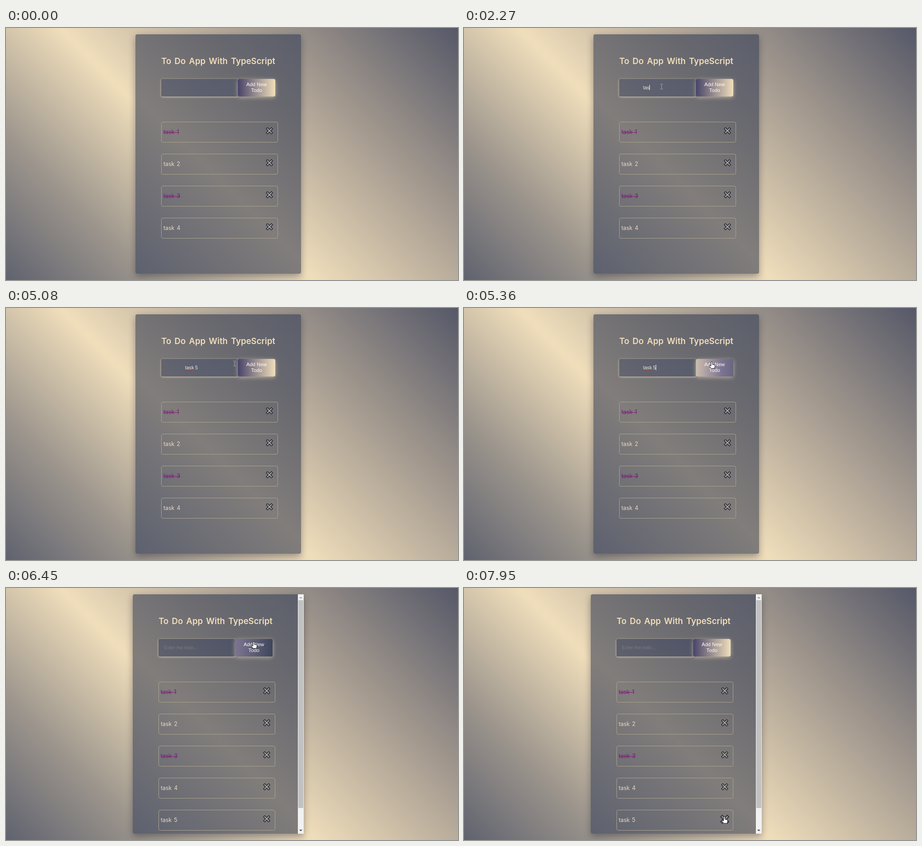
An HTML page for the animation above (8 s loop, 1002 px wide and 559 px high).

```html
<!DOCTYPE html>
<html lang="en">
<head>
<meta charset="utf-8">
<title>To Do App</title>
<style>
  :root { --wheat: #f0debb; --loop: 8s infinite; }
  html, body { margin: 0; width: 100%; height: 100%; overflow: hidden; }
  body {
    position: relative;
    background: linear-gradient(45deg, #5f626e, #9b948c 20%, #f0debb 43.5%, #9c938b 75%, #555868);
    font-family: Inter, "Noto Sans", sans-serif;
  }
  body div, body svg { position: absolute; box-sizing: border-box; }

  .card {
    left: 287px; top: 14px; width: 367px; height: 531px; border-radius: 4px;
    background: linear-gradient(45deg, #5d616f, #817d7b 44%, #69696f 75%, #5b5e6b);
    box-shadow: 0 6px 16px rgba(20, 22, 40, .38);
    animation: widen var(--loop) step-end;
  }
  @keyframes widen { 80.625%, to { left: 281px; width: 379px; } }

  .content { left: 0; top: 0; animation: shift var(--loop) step-end; }
  @keyframes shift { 80.625%, to { transform: translateX(-6px); } }

  .title {
    left: 320px; top: 63px; width: 301px; text-align: center; white-space: nowrap;
    font-size: 18.6px; line-height: 20px; font-weight: 600; word-spacing: 2.6px; color: var(--wheat);
  }

  .input, .button, .placeholder, .field { font-family: "Liberation Sans", Arial, sans-serif; }
  .input {
    left: 344px; top: 113px; width: 170px; height: 39px; border-radius: 4px;
    background: linear-gradient(45deg, #656670, #5d606e 45%, #595c6b);
    box-shadow: 0 1px 4px rgba(240, 222, 187, .85);
    animation: darken var(--loop) step-end;
  }
  @keyframes darken { 80.625%, to { background: linear-gradient(45deg, #5f616d, #585b69 45%, #505467); } }

  .button {
    left: 514px; top: 113px; width: 83px; height: 39px; padding-top: 6px; border-radius: 4px;
    font-size: 11.2px; line-height: 13px; text-align: center; color: #fffaf2;
    background: linear-gradient(90deg, #48446a, #f0debb 33.3%, #7d7592 66.7%, #3e465c) 0 0 / 300% 100%;
    box-shadow: 0 2px 10px rgba(240, 222, 187, .6);
    animation: hover var(--loop);
  }
  @keyframes hover {
    0%, 64.125% { background-position: 0 0; animation-timing-function: ease; }
    71.625%, 84.125% { background-position: 100% 0; animation-timing-function: ease; }
    91.625%, to { background-position: 0 0; }
  }

  .placeholder {
    left: 356px; top: 126px; white-space: nowrap; font-size: 10.5px; line-height: 12px; color: #7b7a7e;
  }
  .field { left: 397px; top: 126px; font-size: 10.6px; animation: blur var(--loop) step-end; }
  @keyframes blur { 70%, to { left: 356px; } }

  .typed {
    height: 12px; box-sizing: content-box !important; overflow: hidden; white-space: pre;
    line-height: 12px; color: #f3ead8; border-right: 1.3px solid transparent;
    animation: type var(--loop) step-end, blink var(--loop) step-end;
  }
  @keyframes type {
    0% { width: 0; }
    23.375% { width: .278em; }
    25.125% { width: .834em; }
    28.375% { width: 1.334em; }
    30% { width: 1.834em; }
    32.5% { width: 2.112em; }
    50.75% { width: 2.668em; }
    80.625%, to { width: 0; }
  }
  @keyframes blink {
    0%, 9.125%, 22.625%, 39.125%, 57.5%, 70%, to { border-color: transparent; }
    2.5%, 15.75%, 23.375%, 45.75%, 64.125% { border-color: #fff; }
  }
  .misspelt {
    top: 10px; width: 20px; height: 1.5px; background: #d0332c; opacity: 0;
    animation: misspelt var(--loop) step-end;
  }
  @keyframes misspelt { 32.5% { opacity: 1; } 80.625%, to { opacity: 0; } }

  .row {
    left: 344px; top: calc(208px + var(--i) * 71px); width: 259px; height: 46px; padding-left: 4px;
    border: 1px solid #aaa38e; border-radius: 4px; white-space: nowrap;
    font-size: 12.4px; line-height: 44px; word-spacing: 1.5px; color: #ecdaba;
  }
  .done { color: #7d167c; text-decoration: line-through 1px; }
  .cross { left: 229px; top: 9px; width: 20px; height: 20px; overflow: visible; }
  .cross use { stroke: #1d1e2a; stroke-width: 5.2; }
  .cross use + use { stroke: #a6a49f; stroke-width: 2.7; transform: scale(.87); }
  .late { opacity: 0; animation: appear var(--loop) step-end; }
  @keyframes appear { 80.625%, to { opacity: 1; } }
  .late .cross { animation: grow var(--loop); }
  @keyframes grow {
    0%, 96% { transform: none; animation-timing-function: ease; }
    98.5%, to { transform: translateY(1px) scale(1.25); }
  }

  .scrollbar { left: 647px; top: 14px; width: 13px; height: 531px; background: #f1f1f1; }
  .thumb { left: 1px; top: 13px; width: 11px; height: 461px; background: #c1c1c1; }
  .scrollbar svg { left: 0; top: 0; }

  .pointer { left: 0; top: 0; width: 1px; height: 1px; overflow: visible; animation: travel var(--loop); }
  @keyframes travel {
    0%, .875% { transform: translate(893px, 502px); animation-timing-function: ease-in-out; }
    10%, 60.875% { transform: translate(438px, 130px); animation-timing-function: ease-in-out; }
    65.5%, 83.125% { transform: translate(549px, 119px); animation-timing-function: linear; }
    89.25% { transform: translate(433px, 341px); animation-timing-function: linear; }
    90.5% { transform: translate(423px, 405px); animation-timing-function: ease-in-out; }
    92.6% { transform: translate(484px, 494px); animation-timing-function: ease-out; }
    96% { transform: translate(588px, 504px); }
    98.5%, to { transform: translate(577px, 507px); }
  }
  .pointer path { opacity: 0; stroke-linejoin: round; }
  .arrow, .hand { fill: #fff; stroke: #15151c; }
  .beam { fill: none; stroke: #b0aead; }
  .arrow { animation: arrow var(--loop) step-end; }
  .beam { animation: beam var(--loop) step-end; }
  .hand { animation: hand var(--loop) step-end; }
  @keyframes arrow { .875%, 84.125% { opacity: 1; } 8%, 96%, to { opacity: 0; } }
  @keyframes beam { 8% { opacity: 1; } 63.9%, to { opacity: 0; } }
  @keyframes hand { 63.9%, 96%, to { opacity: 1; } 84.125% { opacity: 0; } }
</style>
</head>
<body>
  <svg width="0" height="0"><defs><path id="x" d="M-6.2-6.2 6.2 6.2M6.2-6.2-6.2 6.2"/></defs></svg>

  <div class="card"></div>
  <div class="content">
    <div class="title">To Do App With TypeScript</div>
    <div class="input"></div>
    <div class="button">Add New<br>Todo</div>
    <div class="placeholder late">Enter the todo...</div>
    <div class="field">
      <div class="typed">task 5</div>
      <div class="misspelt"></div>
    </div>

    <div class="row" style="--i:0"><span class="done">task 1</span>
      <svg class="cross" viewBox="-10 -10 20 20"><use href="#x"/><use href="#x"/></svg></div>
    <div class="row" style="--i:1">task 2
      <svg class="cross" viewBox="-10 -10 20 20"><use href="#x"/><use href="#x"/></svg></div>
    <div class="row" style="--i:2"><span class="done">task 3</span>
      <svg class="cross" viewBox="-10 -10 20 20"><use href="#x"/><use href="#x"/></svg></div>
    <div class="row" style="--i:3">task 4
      <svg class="cross" viewBox="-10 -10 20 20"><use href="#x"/><use href="#x"/></svg></div>
    <div class="row late" style="--i:4">task 5
      <svg class="cross" viewBox="-10 -10 20 20"><use href="#x"/><use href="#x"/></svg></div>
  </div>

  <div class="scrollbar late">
    <div class="thumb"></div>
    <svg width="13" height="531">
      <path d="M3 9 6.5 5.5 10 9Z" fill="#a3a3a3"/>
      <path d="M3 522 6.5 525.5 10 522Z" fill="#505050"/>
    </svg>
  </div>

  <svg class="pointer">
    <path class="arrow" d="M0 0V12L2.8 9.5 4.6 13.5 6.5 12.7 4.8 8.8H8.5Z"/>
    <path class="beam" d="M-3-5.5H-1L0-4.5 1-5.5H3M0-4.5V4.5M-3 5.5H-1L0 4.5 1 5.5H3"/>
    <path class="hand" d="M-1.5 1Q0-1 1.5 1V6L6 7Q7.5 7.5 7.5 9L6.5 15H-1.5L-5 9.5Q-5 7.5-3 8.5L-1.5 10Z"/>
  </svg>
</body>
</html>
```
